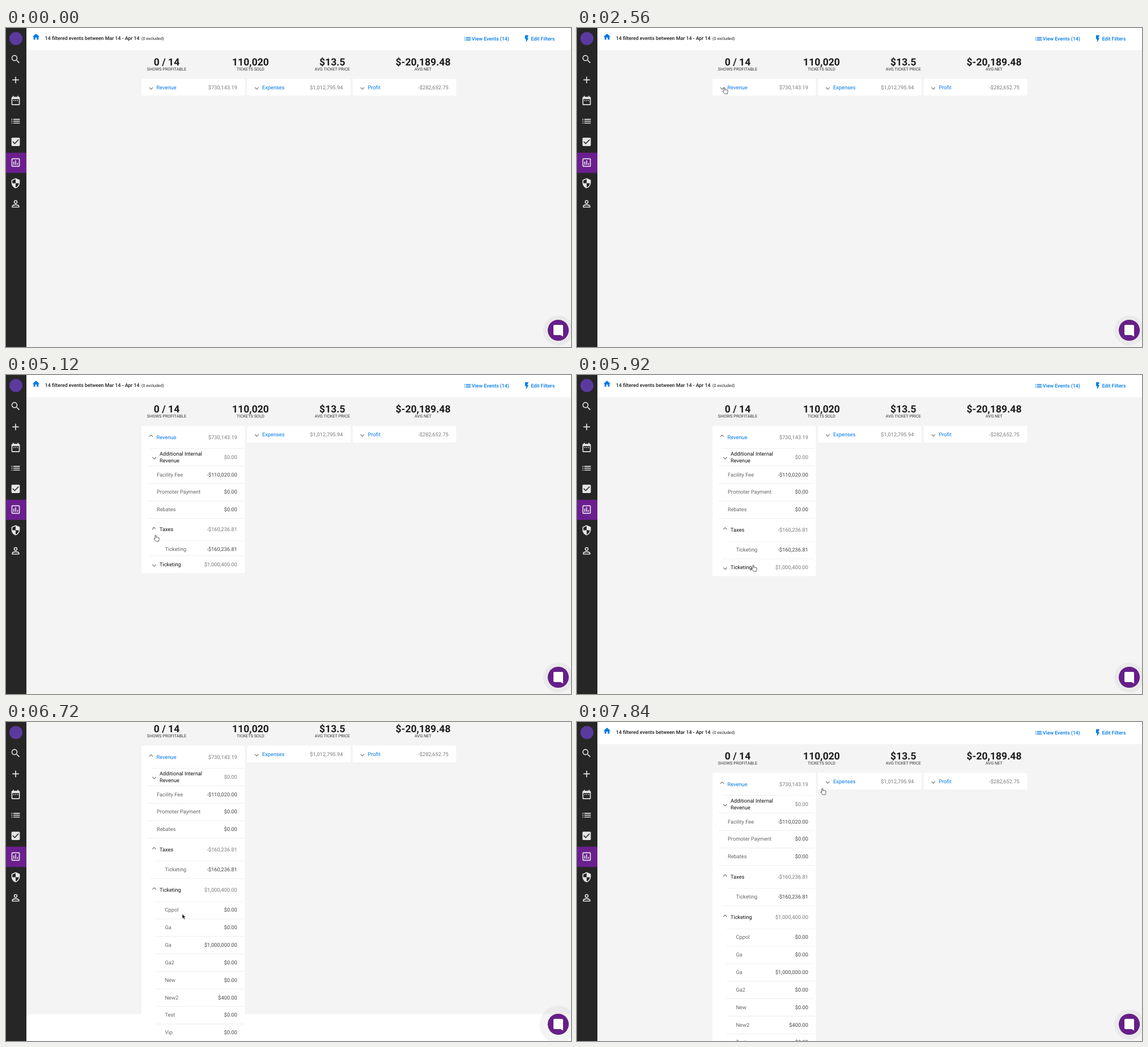
Animation, 997 px wide and 562 px high, one loop 8000 ms. Source, as an HTML page:

```html
<!DOCTYPE html>
<html lang="en">
<head>
<meta charset="utf-8">
<title>Event finances</title>
<style>
  html, body { margin: 0; width: 100%; height: 100%; overflow: hidden; background: #fff; }
  #stage { display: block; width: 100%; height: 100%; }
  text { font: 9.25px Roboto, sans-serif; text-rendering: geometricPrecision; white-space: pre; }
  .end { text-anchor: end; }
  .stat { font-size: 17.6px; font-weight: 700; text-anchor: middle; }
  .caption { font-size: 7.39px; text-anchor: middle; }
  .bar { font-size: 8.8px; font-weight: 500; }
  .small { font-size: 7.2px; }
  .clip { overflow: hidden; }
</style>
</head>
<body>
<svg id="stage" viewBox="0 0 997 562"></svg>
<script>
const LOOP = 8000, STEP = 160;
const ROW = 30.85, TOP = 89.5, PITCH = 186.4, PANEL_WIDTH = 182.5;
const BLUE = '#0079ea', INK = '#1c1c1c', GREY = '#7a7a7a', DARK = '#444', PURPLE = '#661f88';

const ICONS = {
  search: 'M15.5 14h-.79l-.28-.27A6.47 6.47 0 0 0 16 9.5 6.5 6.5 0 1 0 9.5 16c1.61 0 3.09-.59 4.23-1.57l.27.28v.79l5 4.99L20.49 19zm-6 0a4.5 4.5 0 1 1 0-9 4.5 4.5 0 0 1 0 9z',
  add: 'M19 13h-6v6h-2v-6H5v-2h6V5h2v6h6z',
  calendar: 'M9 11H7v2h2zm4 0h-2v2h2zm4 0h-2v2h2zm2-7h-1V2h-2v2H8V2H6v2H5a2 2 0 0 0-2 2v14a2 2 0 0 0 2 2h14a2 2 0 0 0 2-2V6a2 2 0 0 0-2-2zm0 16H5V9h14z',
  list: 'M3 13h2v-2H3zm0 4h2v-2H3zm0-8h2V7H3zm4 4h14v-2H7zm0 4h14v-2H7zM7 7v2h14V7z',
  check: 'M19 3H5a2 2 0 0 0-2 2v14a2 2 0 0 0 2 2h14a2 2 0 0 0 2-2V5a2 2 0 0 0-2-2zm-9 14l-5-5 1.41-1.41L10 14.17l7.59-7.59L19 8z',
  chart: 'M9 17H7v-7h2zm4 0h-2V7h2zm4 0h-2v-4h2zm2 2H5V5h14zm0-16H5a2 2 0 0 0-2 2v14a2 2 0 0 0 2 2h14a2 2 0 0 0 2-2V5a2 2 0 0 0-2-2z',
  shield: 'M12 1L3 5v6c0 5.55 3.84 10.74 9 12 5.16-1.26 9-6.45 9-12V5zm0 10.99h7c-.53 4.12-3.28 7.79-7 8.94V12H5V6.3l7-3.11z',
  person: 'M12 5.9a2.1 2.1 0 1 1 0 4.2 2.1 2.1 0 0 1 0-4.2m0 9c2.97 0 6.1 1.46 6.1 2.1v1.1H5.9V17c0-.64 3.13-2.1 6.1-2.1M12 4a4 4 0 1 0 0 8 4 4 0 0 0 0-8zm0 9c-2.67 0-8 1.34-8 4v3h16v-3c0-2.66-5.33-4-8-4z',
  home: 'M10 20v-6h4v6h5v-8h3L12 3 2 12h3v8z',
  bolt: 'M7 2v11h3v9l7-12h-4l4-8z'
};
const SIDEBAR = ['search', 'add', 'calendar', 'list', 'check', 'chart', 'shield', 'person'];
const TICKETS = [['Cppol', '$0.00'], ['Ga', '$0.00'], ['Ga', '$1,000,000.00'], ['Ga2', '$0.00'],
  ['New', '$0.00'], ['New2', '$400.00'], ['Test', '$0.00'], ['Vip', '$0.00']];

// Pointer path: time, x, y, hand shape
const POINTER = [
  [320, 903, 164, 0], [1280, 452, 120, 0], [1440, 452, 120, 0], [1920, 300, 112, 0], [2080, 300, 112, 0],
  [2400, 260, 105, 1], [3520, 260, 105, 1], [4000, 260, 162, 0], [4640, 263, 268, 1], [5120, 264, 282, 1],
  [5760, 311, 335, 1], [6400, 311, 335, 1], [6560, 311, 338, 0], [7360, 311, 338, 0], [7840, 433, 117, 1]
];

const mix = (a, b, p) => a + (b - a) * p;
const ease = (t, start, length) => 1 - (1 - Math.min(1, Math.max(0, (t - start) / length))) ** 2.2;

const rect = (x, y, w, h, fill, r = 0) =>
  `<rect x="${x}" y="${y}" width="${w}" height="${h}" rx="${r}" fill="${fill}"/>`;
const circle = (x, y, r, fill) => `<circle cx="${x}" cy="${y}" r="${r}" fill="${fill}"/>`;
const write = (x, y, string, fill, kind = '') =>
  `<text x="${x}" y="${y}" fill="${fill}" class="${kind}">${string}</text>`;
const icon = (name, x, y, scale, fill) =>
  `<path transform="translate(${x} ${y}) scale(${scale}) translate(-12 -12)" fill="${fill}" fill-rule="evenodd" d="${ICONS[name]}"/>`;
const divider = (x, y) => `<path d="M${x} ${y}H419.5" stroke="#e6e6e6" stroke-width=".7"/>`;
const chevron = (x, y, open) =>
  `<path transform="translate(${x} ${y}) rotate(${180 * open})" d="M-3.2 .4L0 3.6 3.2 .4" fill="none" stroke="#777" stroke-width="1.2"/>`;
const clip = (y, height, content) =>
  `<svg class="clip" y="${y}" width="997" height="${height}">${content}</svg>`;

function entry(x, y, label, value, labelFill, valueFill, right = 408) {
  const lines = [].concat(label);
  return lines.map((line, i) =>
    write(x, y + 3.3 + (i - (lines.length - 1) / 2) * 12.3, line, labelFill)).join('') +
    write(right, y + 3.3, value, valueFill, 'end');
}

const leaf = (x, y, label, value) => entry(x, y + ROW / 2, label, value, '#666', DARK);

function group(y, label, value, open = 0, children = []) {
  const head = mix(ROW, 40.2, open), body = children.length * ROW * open, middle = y + head / 2;
  const rows = children.map((child, i) => divider(264, i * ROW + .4) + leaf(280.5, i * ROW, ...child));
  return {
    height: head + body,
    svg: chevron(261.5, middle, open) + entry(271, middle, label, value, '#111', GREY) +
      clip(y + head, body, rows.join(''))
  };
}

function panel(index, label, value, open = 0, body = { height: 0, svg: '' }) {
  const x = 239 + index * PITCH, head = mix(29.5, 39.5, open), middle = TOP + head / 2;
  return rect(x, TOP, PANEL_WIDTH, head + body.height * open, '#fff', 2) +
    chevron(x + 17, middle, open) +
    entry(x + 26.6, middle, label, value, BLUE, GREY, x + 169) +
    clip(TOP + head, body.height * open, body.svg);
}

function revenueRows(taxesOpen, ticketingOpen) {
  let y = 0, svg = '';
  const add = (lineX, part) => { svg += divider(lineX, y + .4) + part.svg; y += part.height; };
  const plain = (label, value) => ({ height: ROW, svg: leaf(266, y, label, value) });
  add(255, group(y, ['Additional Internal', 'Revenue'], '$0.00'));
  add(250, plain('Facility Fee', '-$110,020.00'));
  add(250, plain('Promoter Payment', '$0.00'));
  add(250, plain('Rebates', '$0.00'));
  add(250, group(y, 'Taxes', '-$160,236.81', taxesOpen, [['Ticketing', '-$160,236.81']]));
  add(255, group(y, 'Ticketing', '$1,000,400.00', ticketingOpen, TICKETS));
  return { height: y, svg };
}

const stat = (x, value, caption) =>
  write(x, 66.2, value, INK, 'stat') + write(x, 75.3, caption, '#333', 'caption');

const header = rect(0, 0, 997, 562.5, '#f4f4f4') + rect(0, 0, 997, 39, '#fff') +
  icon('home', 53, 15.6, .62, BLUE) +
  write(68.7, 21.2, '14 filtered events between Mar 14 - Apr 14', INK, 'bar') +
  write(239, 21.2, '(0 excluded)', INK, 'small') +
  icon('list', 814.5, 19, .62, BLUE) + write(821.8, 21.7, 'View Events (14)', BLUE, 'bar') +
  icon('bolt', 919, 19, .62, BLUE) + write(926.4, 21.7, 'Edit Filters', BLUE, 'bar') +
  stat(283.5, '0 / 14', 'SHOWS PROFITABLE') + stat(431.5, '110,020', 'TICKETS SOLD') +
  stat(575.8, '$13.5', 'AVG TICKET PRICE') + stat(736, '$-20,189.48', 'AVG NET');

const sidebar = rect(0, 0, 36, 562, '#262626') + rect(0, 219.7, 36, 35.6, '#6b1f8f') +
  circle(17.5, 18.5, 11.5, '#5b3a9e') +
  SIDEBAR.map((name, i) => icon(name, 17, 55 + i * 36.4, .82, '#e6e6e6')).join('');

const launcher = scroll => circle(974.5, 533, 26.5 + scroll * .135, 'rgba(0,0,0,.045)') +
  circle(974.5, 532.5, 18.6, PURPLE) +
  '<path fill="#fff" d="M968 523h13a2 2 0 0 1 2 2v18.500l-4.500-2.500H968a2 2 0 0 1-2-2V525a2 2 0 0 1 2-2z"/>';

function pointer(t) {
  const next = POINTER.findIndex(key => key[0] > t);
  if (next === 0) return '';
  const from = POINTER.at(next < 0 ? -1 : next - 1), to = next < 0 ? from : POINTER[next];
  const p = from === to ? 0 : (t - from[0]) / (to[0] - from[0]);
  const shape = from[3]
    ? '<path fill="#fff" stroke="#333" stroke-width=".8" d="M-1 6.500V.9a1 1 0 0 1 2 0V4.200a.95.95 0 0 1 1.900 0 .9.9 0 0 1 1.700.4.8.8 0 0 1 1.500.5V8l-.9 3H.6L-2.800 7a.9.9 0 0 1 1.300-1.100z"/>'
    : '<path fill="#111" stroke="#fff" stroke-width=".6" d="M0 0V8.500l1.900-1.700 1.400 3.200 1.500-.7-1.400-3.100h2.600z"/>';
  return `<g transform="translate(${mix(from[1], to[1], p)} ${mix(from[2], to[2], p)})">${shape}</g>`;
}

function render(t) {
  const scroll = 48 * (ease(t, 6440, 240) - ease(t, 7120, 220));
  const rows = revenueRows(ease(t, 4985, 225), ease(t, 5960, 225));
  return `<g transform="translate(0 ${-scroll})">` + header +
    panel(0, 'Revenue', '$730,143.19', ease(t, 2900, 225), rows) +
    panel(1, 'Expenses', '$1,012,795.94') +
    panel(2, 'Profit', '-$282,652.75') + '</g>' +
    sidebar + launcher(scroll) + pointer(t);
}

const stage = document.getElementById('stage');
let shown = -1;
function tick() {
  const t = Math.floor(performance.now() % LOOP / STEP) * STEP;
  if (t !== shown) stage.innerHTML = render(shown = t);
  requestAnimationFrame(tick);
}
tick();
</script>
</body>
</html>
```
